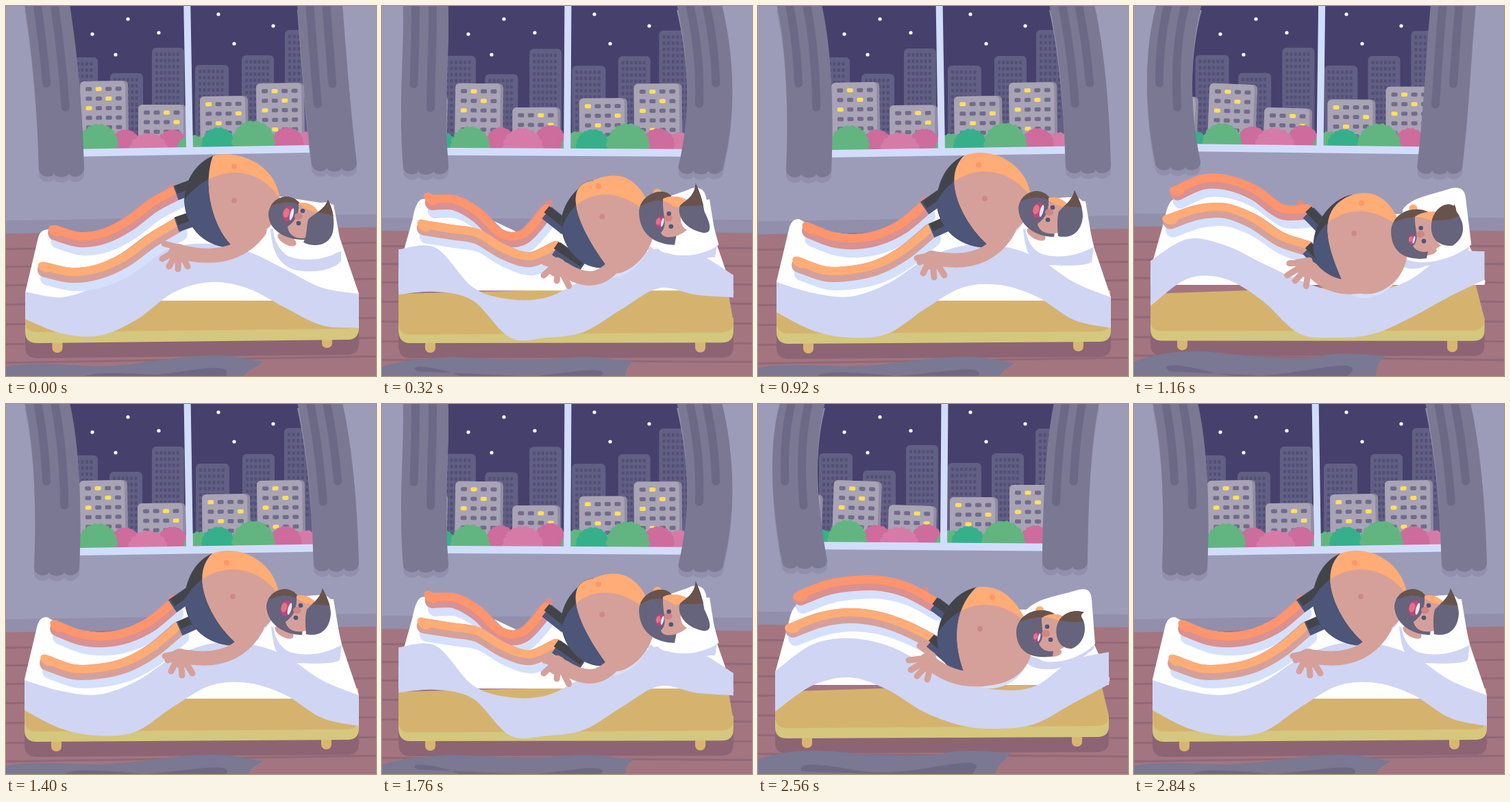
Animation of 540x540 px, one loop 2880 ms. Source, as an HTML page with a canvas:

```html
<!DOCTYPE html>
<html>
<head>
<meta charset="utf-8">
<title>Restless night</title>
<style>
html, body { margin: 0; width: 100%; height: 100%; overflow: hidden; background: #9d9cb8; }
canvas { display: block; width: 540px; height: 540px; }
</style>
</head>
<body>
<canvas id="stage"></canvas>
<script>
const canvas = document.getElementById('stage');
const g = canvas.getContext('2d');
const ratio = Math.max(1, window.devicePixelRatio || 1);
canvas.width = canvas.height = 540 * ratio;

const STEP = 40, STEPS = 12, TAU = Math.PI * 2;
const SKIN = '#d5a09a', LIT = '#ffac76', NAVY = '#4d5678', DARK = '#434449';
const HAIR = '#66637c', BROWN = '#68534c', GLOW = '#d5e0fd', LAVENDER = '#d0d5f3';
const CURTAIN = '#7a7892', FOLD = '#6c6986';
let cos = 1, sin = 0;

// One sinusoid through three poses at 0, 120 and 330 degrees, kept near their range.
function wave(p, q, r, lo, hi) {
  const near = p - r, far = p - q;
  const a = 0.577 * far + near, b = 1.732 * near - 0.155 * far;
  const min = Math.min(p, q, r), max = Math.max(p, q, r), slack = 0.3 * (max - min);
  return Math.min(hi ?? max + slack, Math.max(lo ?? min - slack, p - a + a * cos + b * sin));
}
const pose = triple => wave(...triple);

const NUM = /-?\d+(\.\d+)?/g;
function path(p, q, r) {
  const qs = q.match(NUM), rs = r.match(NUM);
  let i = 0;
  return new Path2D(p.replace(NUM, n => { const v = wave(+n, +qs[i], +rs[i]); i++; return v.toFixed(2); }));
}

function fill(shape, color) { g.fillStyle = color; g.fill(shape); }
function stroke(shape, color, width, cap = 'round') {
  g.strokeStyle = color; g.lineWidth = width; g.lineCap = cap; g.lineJoin = 'round';
  g.stroke(shape);
}
function rect(x, y, w, h, color, r = 0) {
  g.fillStyle = color; g.beginPath(); g.roundRect(x, y, w, h, r); g.fill();
}
function oval(x, y, rx, ry, color, turn = 0) {
  g.fillStyle = color; g.beginPath(); g.ellipse(x, y, rx, ry, turn, 0, TAU); g.fill();
}
const dot = (x, y, r, color) => oval(x, y, r, r, color);
function at(x, y, draw, degrees = 0) {
  g.save(); g.translate(x, y); g.rotate(degrees * Math.PI / 180); draw(); g.restore();
}
function inside(shape, draw) { g.save(); g.clip(shape); draw(); g.restore(); }

// Smooth curve through points, appended to a path.
function spline(target, pts, start = true) {
  if (start) target.moveTo(...pts[0]); else target.lineTo(...pts[0]);
  for (let i = 0; i < pts.length - 1; i++) {
    const [a, b, c, d] = [pts[i - 1] || pts[i], pts[i], pts[i + 1], pts[i + 2] || pts[i + 1]];
    target.bezierCurveTo(b[0] + (c[0] - a[0]) / 6, b[1] + (c[1] - a[1]) / 6,
      c[0] - (d[0] - b[0]) / 6, c[1] - (d[1] - b[1]) / 6, c[0], c[1]);
  }
  return target;
}
function ripple(x0, x1, p, q, r, lo, hi) {
  return p.map((v, i) => [x0 + (x1 - x0) * i / (p.length - 1), wave(v, q[i], r[i], lo, hi)]);
}

const TOWERS = [
  [[85, 89, 85], [75, 72, 75], 49], [[152, 153, 151], [98, 97, 99], 48],
  [[213, 216, 213], [61, 60, 62], 47], [[276, 277, 277], [86, 86, 87], 49],
  [[344, 341, 345], [72, 72, 73], 47], [[407, 405, 406], [35, 36, 35], 50]
];
// x, y, turn, lit windows as column-row pairs
const HOUSES = [
  [[30, 25, 30], [130, 130, 130], [0, 2, 0], []],
  [[108, 111, 107], [110, 111, 112], [-.8, 2, -1], ['10', '21', '02']],
  [[193, 191, 192], [144, 147, 145], [0, 1.8, -.4], ['20', '31']],
  [[283, 280, 286], [132, 136, 132], [-.7, 0, -.8], ['00', '31', '12']],
  [[365, 367, 366], [113, 118, 112], [-.7, 0, -.8], ['10', '21', '02', '14']]
];
const GREEN = '#62b580', TEAL = '#35b08b', ROSE = '#cd6c9d', PINK = '#d67ba8';
const BUSHES = [
  [[95, 92, 90], [186, 183, 186], 20, TEAL], [[174, 173, 174], [180, 176, 180], 22, ROSE],
  [[243, 246, 243], [180, 175, 179], 23, ROSE], [[135, 130, 134], [172, 169, 174], 29, GREEN],
  [[208, 206, 207], [185, 179, 184], 30, PINK], [[272, 282, 282], [188, 184, 186], 24, GREEN],
  [[310, 307, 310], [177, 178, 179], 25, TEAL], [[441, 436, 438], [183, 183, 184], 24, PINK],
  [[411, 405, 408], [177, 177, 178], 24, ROSE], [[361, 358, 361], [167, 170, 170], 32, GREEN]
];
const STARS = [[178, 19], [126, 41], [223, 39], [160, 71], [310, 12], [390, 29], [333, 55]];

function city() {
  rect(0, 0, 540, 240, '#45416c');
  STARS.forEach(([x, y]) => dot(x, y, 2.6, '#fff'));
  for (const [x, y, w] of TOWERS) at(pose(x), pose(y), () => {
    rect(0, 0, w, 160, '#625f84', 6);
    for (let row = 0; row < 14; row++)
      for (let col = 0; col < 6; col++) rect(5 + col * (w - 10) / 6, 7 + row * 9, 4, 5, '#534f77', 1);
  });
  for (const [x, y, turn, lit] of HOUSES) at(pose(x), pose(y), () => {
    rect(0, 0, 70, 120, '#918ca4', 6);
    rect(0, 0, 66, 120, '#a8a3b5', 6);
    for (let row = 0; row < 6; row++)
      for (let col = 0; col < 4; col++)
        rect(8 + col * 14.5, 8.5 + row * 14, 9, 6, lit.includes(`${col}${row}`) ? '#ffdf5d' : '#716c8a', 2);
  }, pose(turn));
  for (const [x, y, r, color] of BUSHES) {
    const cx = pose(x), cy = pose(y) + r;
    dot(cx, cy, r - 1.5, color);
    for (let i = 0; i < 18; i++) {
      const t = i * TAU / 18;
      dot(cx + (r - 5) * Math.cos(t), cy + (r - 5) * Math.sin(t), 5, color);
    }
  }
}

function room() {
  at(wave(268, 271, 268), wave(211.5, 208, 213), () => {
    rect(-400, -300, 195, 360, '#9d9cb8');
    rect(207, -300, 200, 360, '#9d9cb8');
    rect(-400, 0, 800, 120, '#9d9cb8');
    rect(-5, -300, 10, 300, '#d2ddfc');
    rect(-205, -5.5, 412, 11, '#d2ddfc');
    rect(-400, 97, 800, 30, '#918fab');
    rect(-400, 116, 800, 300, '#a37581');
    for (const y of [137, 163, 190, 218, 247, 276, 303]) rect(-400, y, 800, 3, '#926877');
  }, wave(-1, .4, -.9));
}

function drape(top, c1, c2, low, y, folds) {
  [top, c1, c2, low, y] = [top, c1, c2, low, y].map(pose);
  const w = 66, shape = new Path2D();
  shape.moveTo(top, -2);
  shape.lineTo(top + w, -2);
  shape.bezierCurveTo(c1 + w, 60, c2 + w, 145, low + w, y - 2);
  for (let i = 3; i > 0; i--) {
    const x = low + i * 22;
    shape.bezierCurveTo(x - (i < 3), y + 12, x - 20, y + 13, x - 22, y + (i > 1 ? 5 : 0));
  }
  shape.bezierCurveTo(c2, 145, c1, 60, top, -2);
  at(0, 8, () => fill(shape, '#918fab'));
  fill(shape, CURTAIN);
  for (const [shift, length] of folds) {
    const fold = new Path2D();
    fold.moveTo(top + shift, -6);
    fold.bezierCurveTo(c1 + shift, 60, c2 + shift, 145, low + shift, y);
    g.setLineDash([length, 999]);
    stroke(fold, FOLD, 12);
    g.setLineDash([]);
  }
}

function rug() {
  fill(path(
    'M-5 527 C35 519 80 523 130 526 C190 526 235 511 300 510 C335 509 355 516 376 519 C362 530 348 533 345 545 L-5 545Z',
    'M-5 520 C30 508 60 504 110 507 C160 512 235 516 270 510 C305 503 335 507 370 510 C355 522 348 530 345 545 L-5 545Z',
    'M-5 529 C35 521 75 525 125 526 C190 526 235 513 300 512 C335 511 352 518 374 521 C362 530 354 533 352 545 L-5 545Z'), CURTAIN);
  fill(path(
    'M105 545 C125 530 180 538 220 538 C260 534 325 520 322 535 L320 545Z',
    'M64 536 C55 520 100 527 140 534 C210 550 320 508 319 530 L310 545Z',
    'M85 543 C85 530 150 535 200 540 C255 537 325 522 323 537 L320 545Z'), FOLD);
}

function bed() {
  const base = path(
    'M28 455 L28 476 Q28 492 46 492 L498 487 Q515 487 515 470 L515 455Z',
    'M25 455 L25 472 Q25 488 42 488 L495 486 Q512 486 512 470 L512 455Z',
    'M27 455 L27 476 Q27 493 45 493 L498 490 Q515 490 515 474 L515 455Z');
  at(0, 22, () => fill(base, '#8d6474'));
  rect(wave(67.5, 64, 66), 475, 15, wave(31, 27, 32), '#d8b671', 7);
  rect(wave(461, 458, 460), 475, 15, wave(24, 25, 29), '#d8b671', 7);
  fill(base, '#d5c77d');
  fill(path(
    'M28 420 L28 462 Q29 476 46 476 L498 471 Q515 470 515 458 L514 415Z',
    'M25 420 L25 458 Q26 473 42 473 L495 470 Q512 469 512 455 L500 405Z',
    'M27 420 L27 464 Q28 478 45 478 L498 475 Q515 474 515 460 L514 415Z'), '#d5b36f');
  fill(path(
    'M47 338 Q50 326 62 326 C120 342 140 330 170 312 C205 285 235 262 270 258 L478 290 L486 335 L515 420 L515 430 L28 430 L28 418Z',
    'M45 318 Q50 292 62 292 C100 280 150 270 190 270 C220 272 250 285 270 300 L478 300 L488 345 L513 400 L512 410 L25 410 L25 392Z',
    'M46 322 Q50 310 60 311 C100 335 150 338 180 328 C215 315 230 282 270 268 L478 285 L488 345 L515 425 L515 430 L27 430 L27 402Z'), '#fff');

  const left = wave(28, 25, 27), right = wave(515, 512, 515);
  const sheet = spline(new Path2D(), ripple(left, right,
    [417, 425, 407, 378, 352, 347, 358, 384, 411, 420],
    [390, 351, 342, 352, 378, 405, 417, 412, 375, 362],
    [403, 419, 424, 405, 370, 350, 350, 367, 403, 425], 340, 428));
  spline(sheet, ripple(left, right,
    [457, 478, 481, 458, 418, 403, 412, 440, 466, 470],
    [449, 411, 399, 416, 449, 469, 474, 467, 438, 409],
    [447, 474, 484, 478, 442, 411, 407, 424, 458, 470], 398, 484).reverse(), false);
  fill(sheet, LAVENDER);

  fill(path(
    'M386 325 C388 360 400 380 425 386 C450 390 480 385 489 372 L489 358 C470 365 430 372 410 360 C398 350 392 340 390 325Z',
    'M385 365 C390 385 410 388 430 387 C455 384 475 370 490 357 L490 345 C470 360 440 375 420 374 C405 372 395 368 392 360Z',
    'M387 325 C390 355 396 378 420 378 C450 379 475 380 487 374 L490 352 C470 362 430 367 410 358 C398 348 392 338 392 325Z'), LAVENDER);
  fill(path(
    'M390 310 C410 292 440 290 462 287 C474 285 478 290 480 300 L490 355 C470 372 430 374 410 364 C392 350 388 330 390 310Z',
    'M392 300 C410 282 440 280 468 271 C482 268 486 274 487 285 L492 350 C470 372 440 378 420 376 C395 372 388 330 392 300Z',
    'M390 305 C405 285 430 280 455 279 C468 278 474 282 476 292 L490 350 C470 366 430 370 410 360 C392 348 388 325 390 305Z'), '#fff');
}

function limb(shape, shade, light, cap) {
  stroke(shape, shade, 22, cap);
  at(0, -5, () => stroke(shape, light, 12, cap));
}

function legs() {
  const far = spline(new Path2D(), ripple(wave(72, 62, 75), wave(250, 258, 244),
    [331, 341, 336, 318, 291, 272], [283, 268, 262, 262, 272, 293], [328, 341, 344, 338, 322, 294]));
  const near = spline(new Path2D(), ripple(wave(57, 51, 60), wave(250, 253, 252),
    [385, 393, 388, 371, 343, 320], [330, 315, 309, 313, 326, 346], [378, 391, 390, 381, 360, 328]));
  for (const leg of [far, near]) at(4, 12, () => stroke(leg, GLOW, 22));
  dot(wave(242, 243, 243), wave(267, 273, 284), 6, '#d98d8d');
  limb(far, '#d99191', '#ff956d');
  oval(wave(72, 62, 74), wave(328, 281, 324), 11, 7, '#ff956d', wave(.5, 0, .7));
  limb(near, SKIN, LIT);
  oval(wave(57, 50, 60), wave(381, 327, 374), 11, 7, LIT, wave(.4, .1, .6));
  limb(path('M248 273 L278 262', 'M258 292 L282 310', 'M243 295 L272 275'), NAVY, DARK, 'butt');
  limb(path('M249 319 L278 309', 'M253 346 L290 378', 'M253 328 L280 316'), NAVY, DARK, 'butt');
}

function torso() {
  const skin = path(
    'M302 219 C330 209 395 225 400 285 C400 320 370 335 333 352 C305 330 285 265 302 219Z',
    'M318 268 C365 258 395 310 400 350 C402 395 345 430 302 395 C284 350 285 300 318 268Z',
    'M300 219 C335 203 392 225 399 280 C398 320 365 335 340 352 C305 325 265 255 300 219Z');
  const shorts = path(
    'M302 219 C275 230 258 260 261 290 C265 325 290 352 333 353 C305 330 285 265 302 219Z',
    'M318 268 C285 275 262 310 262 345 C262 365 275 390 302 395 C284 350 285 300 318 268Z',
    'M300 219 C275 230 262 258 261 285 C262 325 295 355 340 352 C305 325 265 255 300 219Z');
  const shade = path(
    'M250 300 C280 240 360 215 404 287 L404 440 L250 440Z',
    'M258 345 C275 300 340 265 397 325 L410 440 L250 440Z',
    'M255 300 C275 235 360 215 404 287 L404 440 L250 440Z');
  at(-3, 6, () => fill(skin, GLOW));
  stroke(shorts, NAVY, 1);
  fill(shorts, DARK);
  inside(shorts, () => fill(shade, NAVY));
  fill(skin, LIT);
  inside(skin, () => fill(shade, SKIN));
  dot(wave(333, 342, 322), wave(234, 282, 232), 4, '#ff956d');
  dot(wave(333, 324, 331), wave(284, 328, 281), 4, '#cd8889');
}

function arm() {
  stroke(path('M370 328 C350 355 315 374 255 359', 'M350 398 C320 405 285 405 252 378', 'M366 326 C350 355 320 379 262 369'), SKIN, 21);
  dot(wave(251, 248, 254), wave(361, 377, 371), 14, SKIN);
  const fingers = path(
    'M255 353 L231 347 M247 358 L228 369 M247 364 L238 380 M252 364 L251 384 M257 364 L265 380',
    'M255 367 L236 353 M244 371 L220 374 M242 377 L223 388 M246 382 L232 397 M252 383 L247 402',
    'M256 363 L232 368 M248 368 L236 374 M249 374 L241 390 M255 374 L257 396 M260 374 L272 393');
  stroke(fingers, SKIN, 9);
}

function head() {
  const beard = path(
    'M427 286 C412 270 386 280 383 302 C382 328 410 343 440 341 L440 300Z',
    'M432 306 C412 294 380 305 377 330 C376 358 395 374 430 368 L436 330Z',
    'M424 278 C410 262 383 272 380 294 C380 320 405 337 432 337 L437 295Z');
  const face = path(
    'M427 288 C440 285 452 292 456 302 C452 315 445 325 440 338 C425 342 412 335 411 322 C425 312 428 300 427 288Z',
    'M414 312 C425 305 440 305 448 312 C438 325 435 340 447 355 C430 365 415 362 410 350 C420 340 413 325 414 312Z',
    'M424 280 C437 277 447 284 452 290 C440 305 437 320 440 330 C425 336 410 330 408 318 C422 308 425 295 424 280Z');
  const hair = path(
    'M470 283 C478 298 480 315 477 330 C472 350 450 353 434 345 C440 335 438 322 441 312 C449 302 463 300 470 283Z',
    'M476 304 C474 305 471 307 472 311 C482 325 477 350 458 357 C440 358 433 340 436 325 C440 307 458 298 476 304Z',
    'M462 269 C468 282 474 292 474 307 C472 330 458 340 438 336 C437 325 436 310 439 300 C448 290 458 285 462 269Z');
  const light = path(
    'M375 265 L485 265 L485 310 C460 297 450 306 430 291 C415 283 400 286 375 296Z',
    'M370 285 L485 285 L485 316 C460 320 450 318 435 315 C420 308 400 310 370 322Z',
    'M372 255 L480 255 L480 296 C460 290 445 297 428 286 C412 276 398 278 372 290Z');
  dot(wave(408, 411, 404), wave(285, 301, 277), 6, LIT);
  oval(wave(410, 428, 406), wave(341, 362, 333), 15, 7, SKIN, wave(.5, 0, .5));
  for (const [shape, shade, lit] of [[beard, HAIR, BROWN], [face, SKIN, LIT], [hair, HAIR, BROWN]]) {
    fill(shape, shade);
    inside(shape, () => fill(light, lit));
  }
  at(wave(412, 407, 409), wave(303, 340, 298), () => {
    const s = wave(1, .65, 1);
    g.scale(s, s);
    oval(0, 0, 8, 12, '#b8477f', .25);
    oval(-3, -1, 4.5, 7, '#e77283', .25);
    oval(5, 1, 2.5, 9, '#e8edff', .25);
  });
  oval(wave(427, 420, 425), wave(307, 335, 301), 6, 5, '#cf8583');
  dot(wave(433, 422, 430), wave(299, 325, 294), 3.3, NAVY);
  dot(wave(427, 427, 423), wave(317, 344, 312), 3.3, NAVY);
}

function draw(step) {
  const turn = step / STEPS * TAU;
  cos = Math.cos(turn);
  sin = Math.sin(turn);
  g.setTransform(ratio, 0, 0, ratio, 0, 0);
  city();
  room();
  drape([27, 32, 27], [37, 15, 41], [46, 19, 45], [48, 35, 41], [239, 230, 240], [[18, 120], [43, 155]]);
  drape([425, 432, 425], [430, 419, 439], [436, 416, 447], [446, 415, 449], [231, 232, 234], [[18, 150], [42, 120]]);
  bed();
  rug();
  legs();
  torso();
  arm();
  head();
}

let start, shown;
function tick(now) {
  start ??= now;
  const step = Math.floor((now - start + 1) / STEP) % STEPS;
  if (step !== shown) draw(shown = step);
  requestAnimationFrame(tick);
}
draw(0);
requestAnimationFrame(tick);
</script>
</body>
</html>
```
